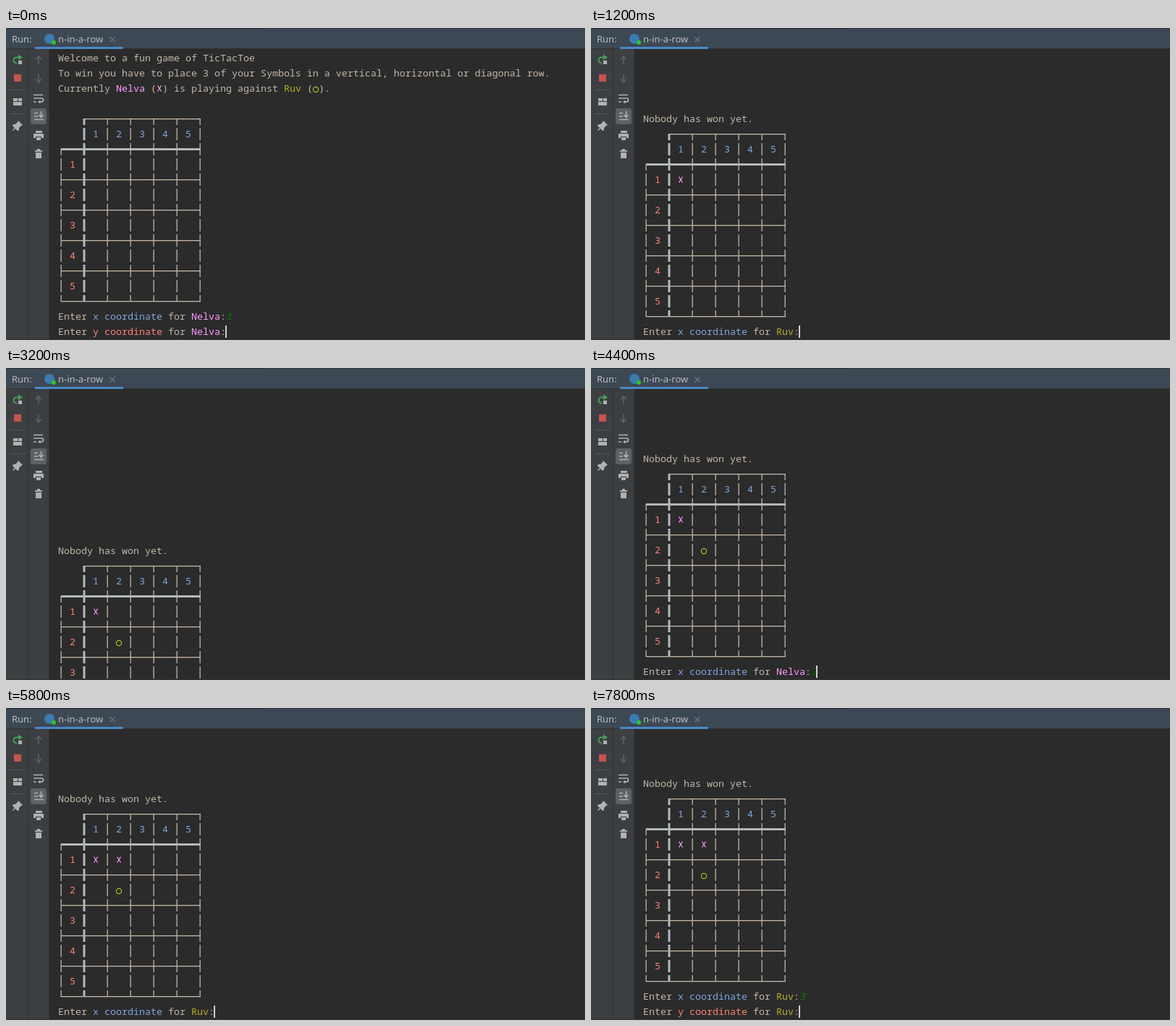
Write an HTML page that moves like this. It is 800 px wide and 431 px high and loops after 8 s.

```html
<!DOCTYPE html>
<html lang="en">
<head>
<meta charset="utf-8">
<title>n-in-a-row</title>
<style>
  html, body { margin: 0; height: 100%; overflow: hidden; background: #2b2b2b; }
  svg { display: block; }
  .ui { font: 13px "Noto Sans", sans-serif; fill: #bbb; }
  #console text { font: 13.333px "Noto Sans Mono", monospace; white-space: pre; }
  #console .input { font-style: italic; }
  .icon { fill: none; stroke: #afb1b3; stroke-width: 1.7; }
  .solid { fill: #afb1b3; }
</style>
</head>
<body>
<svg width="800" height="431" viewBox="0 0 800 431">
  <clipPath id="view"><rect x="60" y="29" width="740" height="401"/></clipPath>

  <rect width="800" height="28" fill="#3d4855"/>
  <rect width="800" height="1" fill="#323437"/>
  <rect width="354" height="1" fill="#292b2d"/>
  <rect y="28" width="800" height="1" fill="#323232"/>
  <rect y="29" width="60" height="402" fill="#3c3f41"/>
  <rect x="30" y="29" width="1" height="402" fill="#323232"/>
  <rect x="59" y="29" width="1" height="402" fill="#353739"/>
  <rect y="430" width="800" height="1" fill="#323232"/>
  <rect x="40" y="26" width="122" height="3" fill="#4a88c7"/>
  <g class="ui">
    <text x="8" y="20">Run:</text>
    <text x="72" y="20">n-in-a-row</text>
  </g>
  <circle cx="60" cy="15" r="7" fill="#3c7bad"/>
  <circle cx="66" cy="20" r="3" fill="#2fc52f"/>
  <path d="M143.500 12.500l7 7m0-7l-7 7" stroke="#6e7680" stroke-width="1.200"/>

  <!-- run toolbar -->
  <path d="M18 40.500h-3a4 4 0 0 0-1 8h1" fill="none" stroke="#499c54" stroke-width="2"/>
  <path d="M17 36.500l6 4-6 4z" fill="#499c54"/>
  <rect class="solid" x="17" y="45" width="5" height="5"/>
  <rect x="11" y="64" width="10" height="10" fill="#c75450"/>
  <path d="M6 85.500h20M6 118.500h20" stroke="#55585a"/>
  <path class="solid" d="M10 97h6v4h-6zM17 97h5v4h-5zM10 102h12v5h-12z"/>
  <path class="solid" d="M17 128l6 6-2 1-3 3v3l-2 1-3-3-3 3-1-1 3-3-3-3 1-2h3l3-3z"/>

  <!-- console toolbar -->
  <g class="icon">
    <path d="M45 50v-11m-4 4.500l4-4.500 4 4.500M45 64v11m-4-4.500l4 4.500 4-4.500" stroke="#606365" stroke-width="1.500"/>
    <path d="M38 92.500h13M38 97h11a2.500 2.500 0 0 1 0 5h-3M38 102h4"/>
    <path class="solid" d="M47.500 99.500v5l-3.500-2.500z" stroke="none"/>
    <rect x="34" y="111" width="22" height="22" rx="3" fill="#5c6164" stroke="none"/>
    <path d="M39 117.500h5M39 122h5M39 126.500h13M48.500 115v8m-3-3l3 3.500 3-3.500"/>
  </g>
  <path class="solid" d="M41 142h9v3h-9zM38 146h14v6h-3v-2h-8v2h-3zM42 151h6v4h-6z"/>
  <path class="solid" d="M40 169h10v2h-10zM43 167h4v2h-4zM41 172h8v8h-8z"/>

  <g clip-path="url(#view)"><g id="console"></g></g>
</svg>
<script>
const LEFT = 72, TOP = 33, CELL = 8, LINE = 21, GLYPH = 17, LAST_ROW = 18, LOOP = 8000;
const PLAIN = '#c3b6a8', BLUE = '#7ea6dd', RED = '#ff8077', PINK = '#ff99ff', OLIVE = '#b3ae2a',
      HEAVY = '#b2b9ba', GREEN = '#008000', DIM_GREEN = '#006400';
const CROSS = '\u2573', RING = '\u25cb';
const players = { x: ['Nelva', PINK], o: ['Ruv', OLIVE] };

const rect = (x, y, w, h, fill = PLAIN) =>
  `<rect x="${x}" y="${y}" width="${w}" height="${h}" fill="${fill}"/>`;
const colX = col => LEFT + col * CELL;

function glyph(text, col, y, color) {
  const cx = colX(col) + 4;
  if (text === CROSS)
    return `<path d="M${cx - 2.5} ${y + 4.5}l5 8m0-8l-5 8" stroke="${PINK}" stroke-width="1.200"/>`;
  if (text === RING)
    return `<circle cx="${cx}" cy="${y + 10}" r="3.600" fill="none" stroke="#a8c023" stroke-width="1.200"/>`;
  const style = color === GREEN || color === DIM_GREEN ? ' class="input"' : '';
  return `<text x="${colX(col)}" y="${y + 13}" fill="${color}"${style}>${text}</text>`;
}

// A text line is a list of [text, colour] segments.
const textLine = (...segments) => ({
  length: segments.reduce((n, [text]) => n + text.length, 0),
  draw(y) {
    let col = 0;
    return segments.map(([text, color = PLAIN]) => {
      const out = glyph(text, col, y, color);
      col += text.length;
      return out;
    }).join('');
  }
});

// Board lines alternate between rules (even) and cells (odd); marks map "x,y" to a symbol.
function boardLine(i, marks) {
  return { length: 25, draw(y) {
    const isRule = i % 2 === 0, row = (i - 1) / 2;
    const from = i === 0 ? y + 8 : y, to = i === 12 ? y + 9 : y + GLYPH;
    let out = '';
    if (isRule) {
      const x = colX(i ? 0 : 4) + 4, w = colX(24) + 5 - x;
      out += i === 2 ? rect(x, y + 7, w, 3, HEAVY) : rect(x, y + 8, w, 1.3);
    }
    for (let col = i < 2 ? 4 : 0; col <= 24; col += 4) {
      const start = i === 2 && col === 0 ? y + 8 : from;
      out += col === 4 ? rect(colX(4) + 2.5, from, 3, to - from, HEAVY)
                       : rect(colX(col) + 3.5, start, 1.3, to - start);
    }
    if (isRule) return out;
    if (row) out += glyph(row, 2, y, RED);
    for (let n = 1; n <= 5; n++) {
      const mark = row ? marks[n + ',' + row] : String(n);
      if (mark) out += glyph(mark, 2 + 4 * n, y, BLUE);
    }
    return out;
  } };
}
const board = marks => Array.from({ length: 13 }, (_, i) => boardLine(i, marks));

const blank = textLine();
const intro = [
  textLine(['Welcome to a fun game of TicTacToe']),
  textLine(['To win you have to place 3 of your Symbols in a vertical, horizontal or diagonal row.']),
  textLine(['Currently '], players.x, [' ('], [CROSS], [') is playing against '], players.o, [' ('], [RING], [').']),
  blank
];
const ask = (axis, player, value = '', inputColor = GREEN) => textLine(
  ['Enter '], [axis + ' coordinate', axis === 'x' ? BLUE : RED], [' for '],
  players[player], [':'], [value, inputColor]);
const typing = (axis, player, value) => ask(axis, player, value, DIM_GREEN);

const round = marks => [textLine(['Nobody has won yet.']), ...board(marks)];
const start = [...intro, ...board({})];
const first = round({ '1,1': CROSS });
const second = round({ '1,1': CROSS, '2,2': RING });
const third = round({ '1,1': CROSS, '2,1': CROSS, '2,2': RING });
const ON = true, OFF = false;

// [time, lines, caret, vertical scroll offset]
const steps = [
  [0,    [...start, ask('x', 'x', '1'), ask('y', 'x')], ON],
  [600,  [...start, ask('x', 'x', '1'), ask('y', 'x')], OFF],
  [700,  [...start, ask('x', 'x', '1'), typing('y', 'x', '1')], ON],
  [900,  [...start, ask('x', 'x', '1'), ask('y', 'x', '1'), blank], ON],
  [1100, [...start, ask('x', 'x', '1'), ask('y', 'x', '1'), blank], OFF, -86],
  [1200, [...first, ask('x', 'o')], ON],
  [2100, [...first, ask('x', 'o')], OFF],
  [2300, [...first, typing('x', 'o', '2')], ON],
  [2700, [...first, ask('x', 'o', '2'), typing('y', 'o', '2')], ON],
  [3000, [...first, ask('x', 'o', '2'), ask('y', 'o', '2'), blank], ON],
  [3200, [...second, ask('x', 'x')], OFF, 127],
  [3300, [...second, ask('x', 'x')], OFF, 65],
  [3400, [...second, ask('x', 'x')], ON],
  [4200, [...second, ask('x', 'x')], OFF],
  [4400, [...second, typing('x', 'x', '2')], ON],
  [5100, [...second, ask('x', 'x', '2'), blank], ON],
  [5300, [...second, ask('x', 'x', '2'), ask('y', 'x')], ON],
  [5500, [...second, ask('x', 'x', '2'), typing('y', 'x', '1')], ON],
  [5700, [...third, ask('x', 'o')], OFF, 127],
  [5800, [...third, ask('x', 'o')], ON],
  [6700, [...third, ask('x', 'o')], OFF],
  [7000, [...third, ask('x', 'o')], ON],
  [7300, [...third, typing('x', 'o', '3')], ON],
  [7600, [...third, ask('x', 'o', '3'), blank], ON],
  [7800, [...third, ask('x', 'o', '3'), ask('y', 'o')], ON]
];

function render([, lines, caret, scroll = 0]) {
  const rowY = i => TOP + (LAST_ROW + 1 - lines.length + i) * LINE + scroll;
  const last = lines.length - 1;
  let out = lines.map((line, i) => line.draw(rowY(i))).join('');
  if (caret) out += rect(Math.max(LEFT, colX(lines[last].length) - 1), rowY(last), 2, GLYPH, '#cfcfcf');
  document.getElementById('console').innerHTML = out;
}

let shown;
function tick() {
  const time = performance.now() % LOOP;
  const step = steps.findLast(([at]) => at <= time);
  if (step !== shown) render(shown = step);
  requestAnimationFrame(tick);
}
tick();
</script>
</body>
</html>
```
